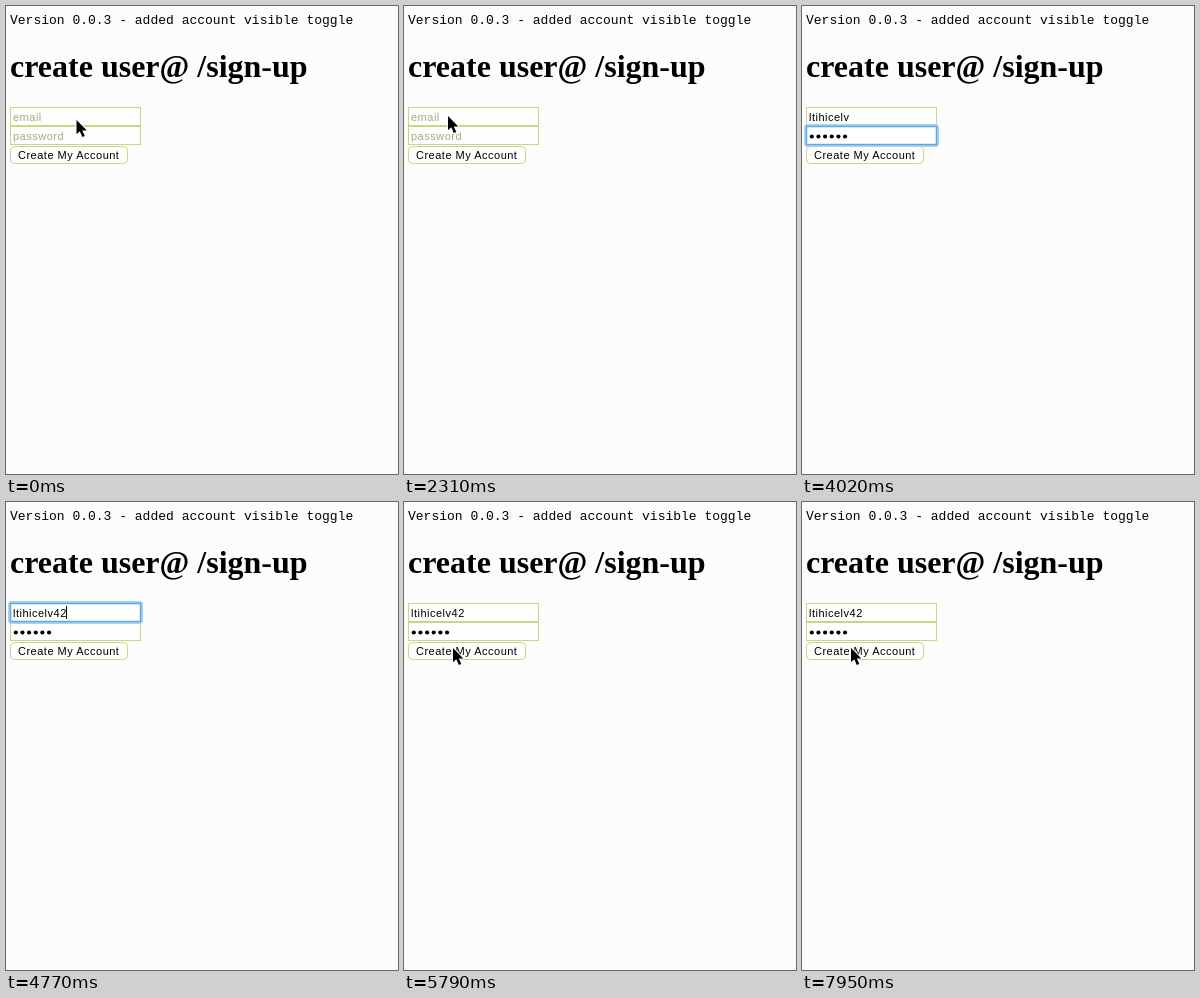
Animation, 392 px wide and 468 px high, one loop 8 s. Source, as an HTML page:

```html
<!DOCTYPE html>
<html lang="en">
<head>
<meta charset="utf-8">
<title>Sign-up form</title>
<style>
  html, body { margin: 0; width: 100%; height: 100%; overflow: hidden; background: #fcfcfd; }
  svg { display: block; width: 392px; height: 468px; }
  text { white-space: pre; }
  .version { font: 13px "Liberation Mono", "Courier New", monospace; }
  .title { font: bold 32px "Liberation Serif", "Times New Roman", serif; }
  .ui { font: 11px "Liberation Sans", Arial, sans-serif; letter-spacing: .5px; }
  .hint { fill: #a9a97e; }
  .box { fill: #fefefe; stroke: #d0d284; }
</style>
</head>
<body>
<svg viewBox="0 0 392 468">
  <rect width="392" height="468" fill="#fcfcfd"/>
  <text class="version" x="4" y="18">Version 0.0.3 - added account visible toggle</text>
  <text class="title" x="4" y="71">create user@ /sign-up</text>

  <rect class="box" x="4.5" y="101.5" width="130" height="18"/>
  <rect class="box" x="4.5" y="120.5" width="130" height="18"/>
  <rect class="box" x="4.5" y="140.5" width="117" height="17" rx="4"/>

  <g id="ring" fill="none">
    <rect x="3.5" y="100.5" width="132" height="20" rx="2" stroke="#a9d3f0" stroke-width="3"/>
    <rect x="4.5" y="101.5" width="130" height="18" fill="#fff" stroke="#5fa9dc" stroke-width="1.5"/>
  </g>

  <text id="email" class="ui" x="7" y="115"></text>
  <text id="password" class="ui hint" x="7" y="134">password</text>
  <g id="dots"></g>
  <text class="ui" x="12" y="153">Create My Account</text>
  <rect id="caret" width="1" height="13"/>

  <path id="pointer" d="M0 0V14.3L3.3 11.3L5.8 17L8.3 15.9L5.8 10.4H10.3Z"
        stroke="#fff" stroke-width="1.6" stroke-linejoin="round" paint-order="stroke"/>
</svg>
<script>
const LOOP = 8000, TICK = 30;
const ADDRESS = "ltihicelv42";
const $ = id => document.getElementById(id);
const ring = $("ring"), email = $("email"), password = $("password"), caret = $("caret"), pointer = $("pointer");

const dots = Array.from({ length: 6 }, (_, i) => {
  const dot = document.createElementNS("http://www.w3.org/2000/svg", "circle");
  dot.setAttribute("cx", 9.8 + i * 6.65);
  dot.setAttribute("cy", 130.5);
  dot.setAttribute("r", 2.1);
  return $("dots").appendChild(dot);
});

// Each move: start, end, destination x, destination y
const moves = [
  [0, 0, 70.5, 114],
  [270, 300, 69, 113],
  [420, 570, 65.5, 112.5],
  [720, 990, 67.5, 111.5],
  [1980, 2310, 44, 110],
  [4770, 5370, 49, 146]
];

const clamp = (v, lo, hi) => Math.max(lo, Math.min(hi, v));
const ease = p => p * p * (3 - 2 * p);
const show = (el, on) => el.setAttribute("visibility", on ? "visible" : "hidden");

// Number of keys pressed by time t
const typed = (t, first, gap, max) => clamp(Math.floor((t - first) / gap) + 1, 0, max);

function pointerAt(t) {
  let x = 0, y = 0;
  for (const [start, end, toX, toY] of moves) {
    if (t < start) break;
    const p = ease(end > start ? clamp((t - start) / (end - start), 0, 1) : 1);
    x += (toX - x) * p;
    y += (toY - y) * p;
  }
  return [x, y];
}

function focusAt(t) {
  if (t < 2490 || t >= 5430) return "";
  return t >= 3330 && t < 4230 ? "password" : "email";
}

function draw(time) {
  const t = Math.floor((time % LOOP) / TICK) * TICK;
  const letters = typed(t, 2940, 30, 9) + typed(t, 4500, 120, 2);
  const bullets = typed(t, 3420, 36, 6);
  const focus = focusAt(t);
  const inPassword = focus === "password";

  email.textContent = letters ? ADDRESS.slice(0, letters) : "email";
  email.setAttribute("class", letters ? "ui" : "ui hint");
  show(password, !bullets);
  dots.forEach((dot, i) => show(dot, i < bullets));

  show(ring, focus);
  ring.setAttribute("transform", `translate(0 ${inPassword ? 19 : 0})`);

  const end = inPassword ? 7 + bullets * 6.65
    : letters ? 7 + email.getComputedTextLength() : 7;
  caret.setAttribute("x", Math.floor(end));
  caret.setAttribute("y", inPassword ? 124 : 104);
  show(caret, focus && !(t >= 4020 && t < 4230));

  const [x, y] = pointerAt(t);
  pointer.setAttribute("transform", `translate(${x} ${y})`);
  show(pointer, t < 2730 || t >= 4800);
}

const begin = performance.now();
function frame() {
  draw(performance.now() - begin);
  requestAnimationFrame(frame);
}
frame();
</script>
</body>
</html>
```
